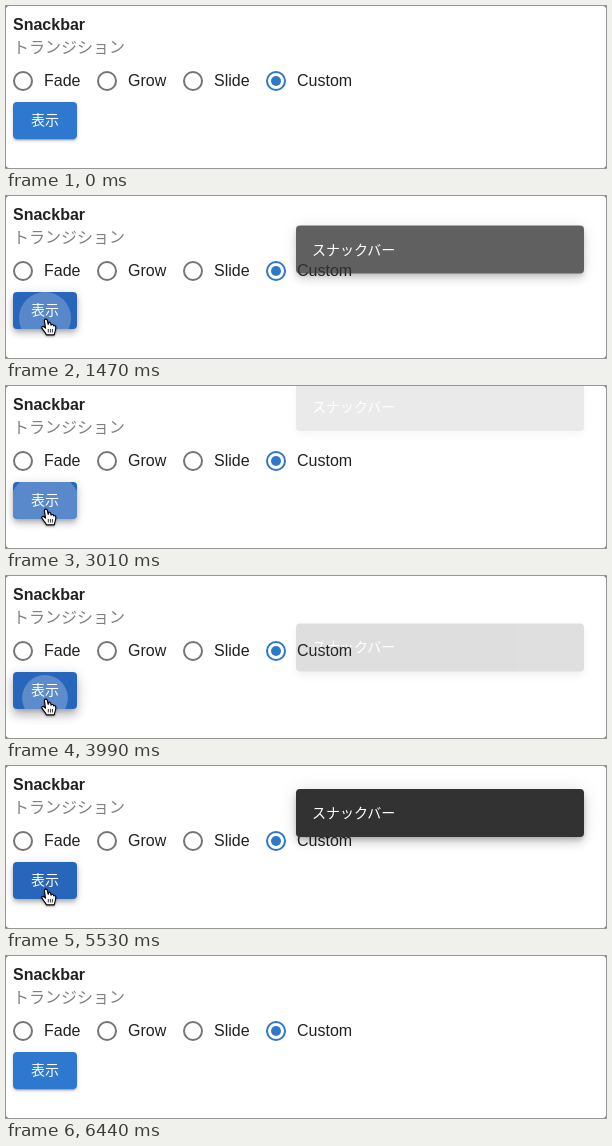
Animation of 600x162 px, one loop 6.51 s. Source, as an HTML page:

```html
<!DOCTYPE html>
<html lang="ja">
<head>
<meta charset="utf-8">
<title>Snackbar</title>
<style>
  html, body { margin: 0; width: 100%; height: 100%; overflow: hidden; background: #666; }
  #stage { position: relative; width: 600px; height: 162px; overflow: hidden; background: #fff;
    border-radius: 3px; font: 16px/20px "Liberation Sans", Arial, sans-serif; color: #212121; }
  #stage > * { position: absolute; white-space: nowrap; }
  .jp { font-family: "Noto Sans CJK JP", "Noto Sans CJK", sans-serif; font-weight: 300; }
  #title { left: 7px; top: 9px; font-weight: bold; }
  #subtitle { left: 7px; top: 30px; color: #808080; }
  .label { top: 65px; }
  svg { left: 0; top: 0; overflow: visible; }
  #button { left: 7px; top: 96px; width: 64px; height: 36.5px; border-radius: 4px; overflow: hidden;
    color: #fff; font-size: 14px; line-height: 34px; text-align: center; }
  .ripple { position: absolute; width: 88px; height: 88px; left: -12px; top: -18px;
    border-radius: 50%; background: #fff; }
  #snack { left: 290px; top: 23px; width: 272px; height: 48px; padding-left: 16px; border-radius: 4px;
    background: #323232; color: #fff; font-size: 14px; line-height: 47px;
    box-shadow: 0 3px 5px -1px rgba(0,0,0,.2), 0 6px 10px rgba(0,0,0,.14), 0 1px 18px rgba(0,0,0,.12); }
  #cursor { filter: drop-shadow(0 1px 1px rgba(0,0,0,.35)); }
</style>
</head>
<body>
<div id="stage">
  <div id="title">Snackbar</div>
  <div id="subtitle" class="jp">トランジション</div>
  <svg id="radios" width="600" height="162"></svg>
  <div id="button" class="jp">表示</div>
  <div id="snack" class="jp">スナックバー</div>
  <svg id="cursor" width="600" height="162">
    <g id="arrow"><path d="M0 0V15.5L3.6 12.2 6 17.6 8.6 16.5 6.3 11.2H11Z" fill="#000" stroke="#fff"/></g>
    <g id="hand">
      <path d="M-1.6 1C-1.6-.7 .9-.9 1.3.8L2.2 5C3-.1 5 4.3 5 5.6 5.6 4.6 7.5 4.8 7.7 6.4 8.5 5.7 9.8 6.3 9.8 7.7 10 10.8 8.8 12.2 8.2 15.4H.4C-.4 12.5-3 10.9-4.1 8.6-4.8 7-2.9 6.4-1.7 7.5L-.5 8.6Z"
        fill="#fff" stroke="#000" stroke-width="1.1" stroke-linejoin="round"/>
      <path d="M2.3 9.5V13M4.4 9.5V13M6.4 9.5V13" stroke="#000" stroke-width=".8"/>
    </g>
  </svg>
</div>
<script>
const LOOP = 6510, STEP = 70, SLIDE = 29;
const HOVER_IN = 400, HOVER_OUT = 6200;
const presses = [[1256, 1358], [2712, 2887], [3793, 3942], [5514, 5654]];
const path = [[70, 264, 151], [210, 176, 142], [350, 88, 131], [490, 52, 126], [560, 46, 125],
  [700, 46, 125], [770, 41, 123.5], [980, 41, 123.5], [1120, 40, 123.5],
  [6160, 40, 123.5], [6230, 62, 136], [6300, 108, 144], [6370, 170, 152], [6440, 200, 190]];
// y offset, blur and spread of the resting, hovered and pressed shadows
const shadows = [
  [[3, 1, -2], [2, 2, 0], [1, 5, 0]],
  [[2, 4, -1], [4, 5, 0], [1, 10, 0]],
  [[5, 5, -3], [8, 10, 1], [3, 14, 2]]
];
const shadowAlpha = [.2, .14, .12];

const $ = id => document.getElementById(id);
const mix = (a, b, k) => a + (b - a) * k;
const clamp = k => Math.min(1, Math.max(0, k));

// cubic-bezier(.4, 0, .2, 1)
function ease(k) {
  k = clamp(k);
  let lo = 0, hi = 1;
  for (let i = 0; i < 24; i++) {
    const s = (lo + hi) / 2, r = 1 - s;
    if (1.2 * r * r * s + .6 * r * s * s + s ** 3 < k) lo = s; else hi = s;
  }
  return lo * lo * (3 - 2 * lo);
}

// Value of a property that eases to each new target in turn
function transition(t, changes, duration) {
  let from = 0, to = 0, start = 0;
  const at = time => mix(from, to, ease((time - start) / duration));
  for (const [time, target] of changes) {
    if (time > t) break;
    [from, to, start] = [at(time), target, time];
  }
  return at(t);
}

const svg = (name, attrs) => {
  const el = document.createElementNS($('radios').namespaceURI, name);
  for (const key in attrs) el.setAttribute(key, attrs[key]);
  $('radios').append(el);
};
[['Fade', 17, 38], ['Grow', 101, 122], ['Slide', 187, 208], ['Custom', 270, 291]].forEach(([name, cx, left], i) => {
  const on = i === 3;
  svg('circle', { cx, cy: 75, r: 9, fill: 'none', stroke: on ? '#2f78c8' : '#757575', 'stroke-width': 2 });
  if (on) svg('circle', { cx, cy: 75, r: 5, fill: '#2f78c8' });
  const label = document.createElement('div');
  label.className = 'label';
  label.textContent = name;
  label.style.left = left + 'px';
  $('stage').insertBefore(label, $('button'));
});

const ripples = presses.map(() => {
  const el = document.createElement('div');
  el.className = 'ripple';
  $('button').append(el);
  return el;
});

const hoverChanges = [[HOVER_IN, 1], [HOVER_OUT, 0]];
const levelChanges = [[HOVER_IN, 1], ...presses.flatMap(([down, up]) => [[down, 2], [up, 1]]), [HOVER_OUT, 0]];

function drawButton(t) {
  const hover = transition(t, hoverChanges, 250);
  const level = transition(t, levelChanges, 250);
  const base = Math.min(1, Math.floor(level));
  const rgb = [[47, 40], [120, 102], [207, 187]].map(([a, b]) => Math.round(mix(a, b, hover)));
  $('button').style.background = `rgb(${rgb})`;
  $('button').style.boxShadow = shadowAlpha.map((alpha, i) => {
    const size = shadows[base][i].map((v, j) => mix(v, shadows[base + 1][i][j], level - base) + 'px');
    return `0 ${size.join(' ')} rgba(0,0,0,${alpha})`;
  }).join();
  presses.forEach(([down, up], i) => {
    const grow = ease((t - down) / 550);
    const fade = 1 - ease((t - up) / 550);
    ripples[i].style.transform = `scale(${grow})`;
    ripples[i].style.opacity = t < down ? 0 : mix(.2, .3, grow) * fade;
  });
}

function drawSnack(t) {
  const [a, b, c, d] = presses.map(p => p[1]);
  const shown = t < b ? ease((t - a) / 225)
    : t < c ? 1 - ease((t - b) / 195)
    : t < d ? ease((t - c) / 225)
    : 1 - ease((t - d) / 195);
  const leaving = t >= d || (t >= b && t < c);
  $('snack').style.opacity = shown;
  $('snack').style.transform = `translateY(${(leaving ? -SLIDE : SLIDE) * (1 - shown)}px)`;
}

function drawCursor(t) {
  const next = path.findIndex(p => p[0] > t);
  const visible = next > 0;
  $('cursor').style.display = visible ? '' : 'none';
  if (!visible) return;
  const [t0, x0, y0] = path[next - 1], [t1, x1, y1] = path[next];
  const k = (t - t0) / (t1 - t0), x = mix(x0, x1, k), y = mix(y0, y1, k);
  const over = x < 71 && y < 133;
  for (const id of ['arrow', 'hand']) {
    $(id).setAttribute('transform', `translate(${x} ${y})`);
    $(id).style.display = (id === 'hand') === over ? '' : 'none';
  }
}

function frame() {
  const t = Math.floor(performance.now() % LOOP / STEP) * STEP;
  drawButton(t);
  drawSnack(t);
  drawCursor(t);
  requestAnimationFrame(frame);
}
frame();
</script>
</body>
</html>
```
